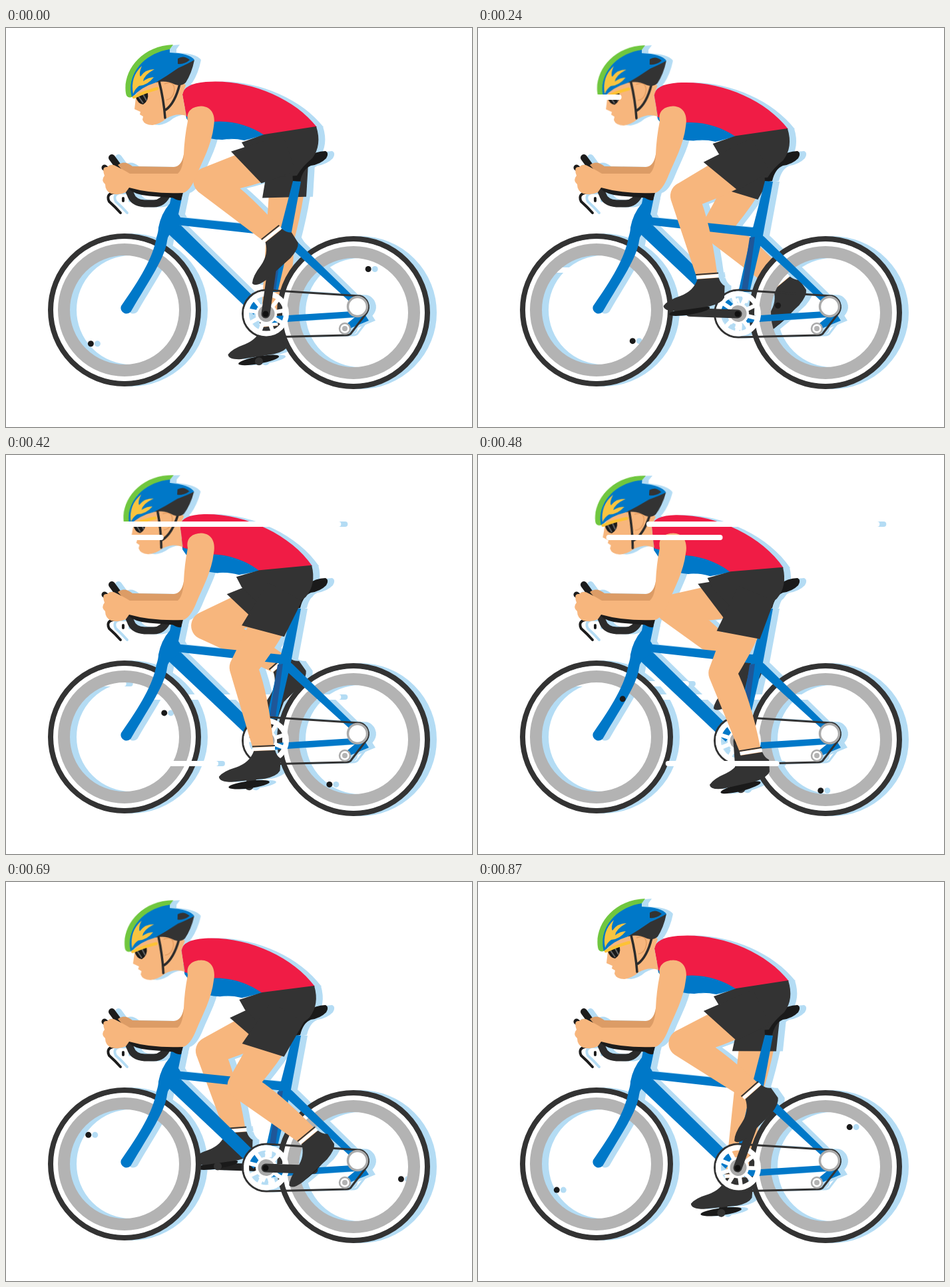
Animation, 700 px wide and 600 px high, one loop 0.9 s. Source, as an HTML page:

```html
<!DOCTYPE html>
<html lang="en">
<head>
<meta charset="utf-8">
<title>Cyclist</title>
<style>
  html, body { margin: 0; width: 100%; height: 100%; overflow: hidden; background: #fff; }
  svg { display: block; width: 700px; height: 600px; }
  #scene { filter: drop-shadow(10px 0 0 #b4dcf4); }
  .skin { fill: #f7b67d; }
  .dark { fill: #333; }
  .black { fill: #1a1a1a; }
  .blue { fill: #0078c8; }
  .line { fill: none; stroke-linecap: round; stroke-linejoin: round; }
  .wind { stroke: #fff; stroke-width: 8; stroke-linecap: round; }
</style>
</head>
<body>
<svg viewBox="0 0 700 600">
  <defs>
    <g id="wheel" fill="none">
      <circle r="110.7" stroke="#333" stroke-width="8.6"/>
      <circle r="103" stroke="#fff" stroke-width="8"/>
      <circle r="91" stroke="#b3b3b3" stroke-width="18"/>
    </g>
    <g id="shoe">
      <path d="M-17 -4H17" stroke="#333" stroke-width="2"/>
      <path d="M-16.5 0H17" stroke="#fff" stroke-width="5"/>
      <path class="dark" d="M-15 3L17 3Q19 12 25 16L23 34Q18 42 0 45L-50 48Q-69 47 -69 39Q-62 31 -42 26Q-22 20 -15 3Z"/>
    </g>
    <ellipse id="pedal" class="black" cy="-2" rx="31" ry="5.5"/>
  </defs>
  <g id="scene">
    <g id="backWind"></g>

    <g id="far">
      <path class="crank line" stroke="#222" stroke-width="11"/>
      <use class="pedal" href="#pedal"/>
      <path class="leg skin"/>
      <use class="foot" href="#shoe"/>
      <circle class="axle dark" r="6"/>
      <path class="sleeve dark"/>
    </g>

    <use href="#wheel" x="178" y="424"/>
    <use href="#wheel" x="522" y="428"/>

    <g id="bike">
      <path class="black" d="M430 210Q440 205 452 195Q465 185 480 185Q486 188 481 196Q472 205 458 207Q446 212 442 230L431 232Z"/>
      <path class="blue" d="M431 230L443 231L428 312L408 397L391 397L411 308Z"/>
      <path d="M408 315L416 314L405 394L396 394Z" fill="#1f5798"/>
      <path class="blue" d="M420 306L430 314L526 408L519 414L418 322Z"/>
      <path class="blue" d="M392 434L520 426L538 429L545 440L516 452L513 444L524 435L392 444Z"/>
      <path class="blue" d="M254 284L412 300L426 296L424 314L408 313L256 296Z"/>
      <path class="blue" d="M241 307L262 296L384 416L372 431Z"/>
      <path class="blue" d="M249 250L264 256L259 280Q268 292 256 302Q243 309 242 320C239 345 216 378 189 424A8.5 8.5 0 1 1 173 418C201 378 221 345 226 315Q229 306 229 300Q233 279 246 264Z"/>
      <path class="line" stroke="#333" stroke-width="3" d="M391 394L532 403A17 17 0 0 1 542 428L519 458Q517 462 511 462L391 465A35.5 35.5 0 0 1 391 394"/>
      <circle cx="528" cy="419" r="14.5" fill="#fff" stroke="#aaa" stroke-width="3.5"/>
      <circle cx="509" cy="452" r="8" fill="#fff" stroke="#aaa" stroke-width="2.5"/>
      <circle cx="509" cy="452" r="4" fill="#b3b3b3"/>
    </g>

    <g id="ring" fill="none" stroke="#fff">
      <circle r="30" stroke-width="8"/>
      <g id="spokes" stroke-width="6"></g>
      <circle r="16" fill="#fff" stroke="none"/>
      <circle r="12.5" fill="#aaa" stroke="none"/>
    </g>
    <circle id="dotA" class="black" r="4.5"/>
    <circle id="dotB" class="black" r="4.5"/>

    <g id="near">
      <path class="crank line" stroke="#333" stroke-width="13"/>
      <circle cx="390" cy="430" r="4.5" fill="#111"/>
      <use class="pedal" href="#pedal"/>
      <path class="leg skin"/>
      <use class="foot" href="#shoe"/>
    </g>

    <g class="upper">
      <path class="blue" d="M268 120L320 136L392 150L388 161L358 169Q340 165 325 168Q305 168 290 160L271 136Z"/>
      <path d="M265 100Q267 84 300 81C362 76 432 104 467 149L388 161C368 147 338 138 311 141L271 133Z" fill="#f01c45"/>
      <path class="dark" d="M354 172L388 160L466 148Q475 176 460 196Q445 208 437 222L405 224L363 187Z"/>
    </g>
    <path id="shorts" class="dark"/>

    <g class="upper">
      <path class="skin" d="M196 96L193 122L202 126L201 130L206 133L205 138Q208 146 220 146Q232 144 241 136Q256 127 271 132L265 100L270 86L255 70L200 80Z"/>
      <path d="M238 84Q252 78 253 92Q252 106 241 108" class="skin" stroke="#e39d62" stroke-width="1.5"/>
      <path class="black" d="M195 104Q204 96 213 98Q215 109 206 115Q198 114 195 104Z"/>
      <path d="M199 103L206 113M206 100L211 109" stroke="#666" stroke-width="2"/>
      <path class="line" d="M230 80Q237 108 239 135M261 84Q254 113 240 123" stroke="#2b2b2b" stroke-width="3.5"/>
      <path class="dark" d="M225 82L250 58L283 48Q279 68 270 82Q264 88 254 85Q240 78 225 82Z"/>
      <path class="blue" d="M188 103C180 70 207 37 246 31L246 37Q276 38 283 48Q273 54 259 60Q242 72 225 82Q202 89 190 104Z"/>
      <path d="M189 104Q181 106 180 98C175 66 202 27 251 25L246 32C207 38 180 70 189 104Z" fill="#70c73f"/>
      <path d="M191 99Q186 74 204 57Q199 69 202 73Q209 62 223 62Q207 71 206 80Q214 74 222 74Q213 86 200 87Q194 91 191 99Z" fill="#f9c440"/>
      <path class="line" d="M192 104Q208 96 227 91" stroke="#fdc235" stroke-width="4.5"/>
      <path class="dark" d="M258 46Q267 40 276 48Q268 55 258 54Z"/>
    </g>

    <g class="line" stroke="#1c1c1c">
      <path d="M159 195L178 221" stroke-width="10"/>
      <path d="M148 210L158 218" stroke-width="9"/>
      <path d="M179 232L187 250Q191 263 208 264L222 264Q236 264 243 248" stroke="#2b2b2b" stroke-width="11"/>
      <path d="M186 238Q196 247 215 248L252 251" stroke-width="9"/>
      <path d="M170 247Q148 247 155 261Q164 269 172 278M176 256V260" stroke-width="4"/>
    </g>
    <path class="black" d="M240 245L267 244L263 259Q256 260 249 254Z"/>
    <path d="M168 206Q178 198 190 208L252 209Q264 208 267 190L276 200L264 221L182 222Z" fill="#dc9c66"/>
    <path class="skin" d="M273 140C270 124 281 118 293 117.5C311 118 315 134 312 148C309 175 295 200 286 222Q277 245 266 248Q220 250 185 240L180 247Q170 252 158 249Q149 245 149 235Q142 229 148 222Q143 208 152 209Q158 203 166 208Q178 214 186 219L258 219Q266 212 267 190Q268 165 273 140Z"/>

    <g id="frontWind"></g>
  </g>
</svg>
<script>
const LOOP = 900, STEP = 30, TAU = Math.PI * 2, RAD = TAU / 360;
const CRANK = 72, THIGH = 130, SHIN = 126;
const $ = s => document.querySelector(s);

// Swings around mid once per loop, highest at time peak
const wave = (t, mid, amp, peak) => mid + amp * Math.cos(TAU * (t - peak) / LOOP);
const turn = t => -360 * t / LOOP;

const move = (p, v, k) => [p[0] + v[0] * k, p[1] + v[1] * k];
const pt = p => p.map(v => v.toFixed(2)).join(' ');
const orbit = (c, r, deg) => move(c, [Math.sin(deg * RAD), -Math.cos(deg * RAD)], r);

function axes(p, q) {
  const x = q[0] - p[0], y = q[1] - p[1], l = Math.hypot(x, y);
  return { u: [x / l, y / l], n: [-y / l, x / l], l };
}

// Two-bone joint, bending forward
function findKnee(hip, ankle) {
  const { u, n, l } = axes(hip, ankle);
  const along = (THIGH ** 2 + l ** 2 - SHIN ** 2) / (2 * l);
  const side = Math.sqrt(Math.max(0, THIGH ** 2 - along ** 2));
  return move(move(hip, u, along), n, side);
}

// Tapered limb with round ends; bulge swells the rear edge
function taper(p, q, r1, r2, bulge) {
  const { u, n, l } = axes(p, q);
  const mid = move(move(p, u, l * .38), n, -bulge);
  return `M${pt(move(p, n, r1))}L${pt(move(q, n, r2))}A${r2} ${r2} 0 0 0 ${pt(move(q, n, -r2))}` +
    `Q${pt(mid)} ${pt(move(p, n, -r1))}A${r1} ${r1} 0 0 0 ${pt(move(p, n, r1))}Z`;
}

function sleeve(hip, knee) {
  const { u, n } = axes(hip, knee);
  const slope = Math.atan2(u[1], -u[0]) / RAD;
  const h = (.74 * (90 - slope) - 6) * RAD;
  const hem = [Math.cos(h), Math.sin(h)], c = move(hip, u, 68);
  return 'M' + [move(c, hem, -33), move(hip, n, 28), move(hip, n, -30), move(c, hem, 33)].map(pt).join('L') + 'Z';
}

function drawLeg(id, t, hip, shorts) {
  const set = (name, key, value) => $(`#${id} .${name}`)?.setAttribute(key, value);
  const pedal = orbit([390, 430], CRANK, 8 + turn(t));
  const pitch = wave(t, 22, 23, 790);
  const ankle = [pedal[0] + wave(t, 9, 19, 300), pedal[1] - wave(t, 52, 4, 400)];
  const knee = findKnee(hip, ankle);
  set('crank', 'd', `M390 430L${pt(pedal)}`);
  set('pedal', 'transform', `translate(${pt(pedal)}) rotate(${-pitch - 5})`);
  set('axle', 'transform', `translate(${pt(pedal)})`);
  set('leg', 'd', taper(hip, knee, 26, 21, 34) + taper(knee, ankle, 21, 15.5, 27));
  set('foot', 'transform', `translate(${pt(ankle)}) rotate(${-pitch})`);
  shorts.setAttribute('d', sleeve(hip, knee));
}

// Streaks: height, start time, speed, tail delay
const BACK = [[364, 85, .84, 232], [344, 330, 1.28, 90]];
const FRONT = [[104, 85, .84, 232], [124, 298, 1.2, 90], [464, 260, 1.2, 90]];
const run = (time, speed) => time > 0 ? speed * time ** 1.1 : -30;

function makeWind(box, rows) {
  $(box).innerHTML = rows.map(([y]) => `<line class="wind" y1="${y}" y2="${y}"/>`).join('');
  return rows.map((row, i) => [$(box).children[i], ...row]);
}
const wind = [...makeWind('#backWind', BACK), ...makeWind('#frontWind', FRONT)];

$('#spokes').innerHTML = Array.from({ length: 9 }, (_, i) =>
  `<path d="M0 -12V-30" transform="rotate(${i * 40})"/>`).join('');

function draw(t) {
  const bob = wave(t, .5, .5, 500) ** 2;
  const hip = [425 - 8 * bob, 187 + 21 * bob];
  drawLeg('far', t + LOOP / 2, hip, $('#far .sleeve'));
  drawLeg('near', t, hip, $('#shorts'));
  for (const part of document.querySelectorAll('.upper')) {
    part.setAttribute('transform', `translate(${-5 * bob} ${8 * bob}) rotate(${4 * bob} 280 110)`);
  }
  $('#ring').setAttribute('transform', `translate(391 429.5) rotate(${turn(t)})`);
  $('#dotA').setAttribute('transform', `translate(${pt(orbit([178, 425.5], 70.6, turn(t) - 134.2))})`);
  $('#dotB').setAttribute('transform', `translate(${pt(orbit([522, 432], 73, turn(t) + 17.7))})`);
  for (const [el, , start, speed, delay] of wind) {
    const head = run(t - start, speed) - 4;
    const tail = run(t - start - delay, speed * 1.11) + 4;
    el.setAttribute('x1', Math.min(tail, head));
    el.setAttribute('x2', head);
  }
}

function tick() {
  const t = performance.now() % LOOP;
  draw(Math.floor(t / STEP) * STEP);
  requestAnimationFrame(tick);
}
tick();
</script>
</body>
</html>
```
